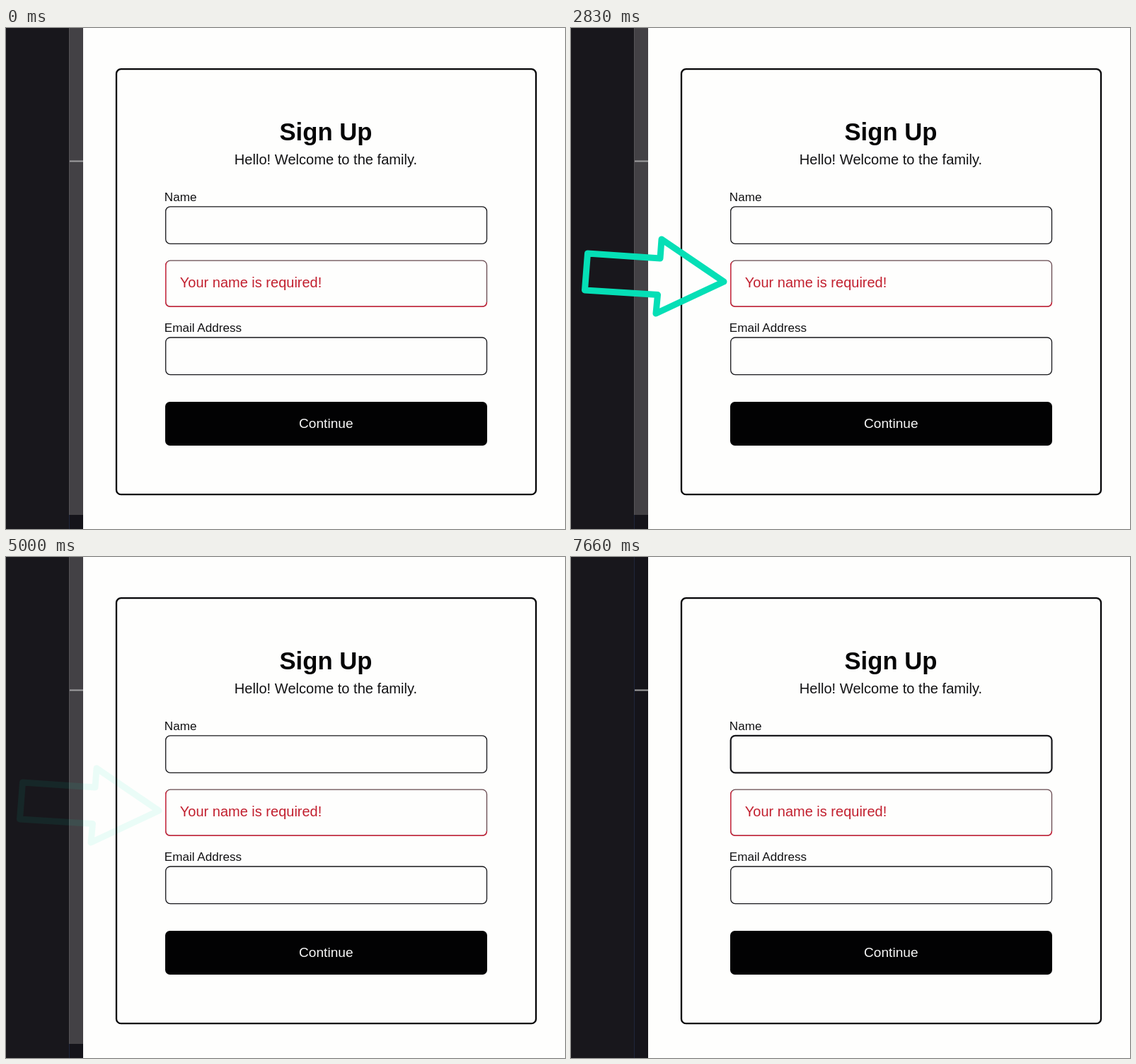
Recreate the animation shown at these times as an HTML page. Size 790 by 709 pixels, loop 8 s.

```html
<!DOCTYPE html>
<html lang="en">
<head>
<meta charset="utf-8">
<title>Sign Up</title>
<style>
  html, body { margin: 0; width: 100%; height: 100%; overflow: hidden; background: #fefefd; }
  svg { display: block; width: 100vw; height: 100vh; }
  text { font-family: "Liberation Sans", Arial, sans-serif; fill: #111113; }
  .mid { text-anchor: middle; }
  .label { font-size: 17.1px; }
  .box { fill: none; stroke: #17171b; stroke-width: 1.3; }
</style>
</head>
<body>
<svg viewBox="0 0 790 709">
  <rect width="790" height="709" fill="#fefefd"/>

  <rect width="109" height="709" fill="#18171c"/>
  <rect x="90" width="19" height="709" fill="#15141a"/>
  <rect x="89" width="1" height="709" fill="#20263a"/>
  <g id="bar">
    <rect x="89" width="20" height="689" fill="#434145"/>
    <rect x="89" width="1" height="689" fill="#565458"/>
  </g>
  <rect x="90" y="187.5" width="19" height="2" fill="#a09fa1"/>

  <rect x="156" y="58.2" width="593" height="602" rx="6.5" fill="none" stroke="#050507" stroke-width="2.3"/>
  <text class="mid" x="452" y="158.5" font-size="34.7" font-weight="700" style="fill:#050506">Sign Up</text>
  <text class="mid" x="452" y="193" font-size="20.1">Hello! Welcome to the family.</text>

  <text class="label" x="223.8" y="244.5">Name</text>
  <rect id="name" class="box" x="225.7" y="252.8" width="453.8" height="52.6" rx="6.5"/>

  <rect class="box" x="225.7" y="329.2" width="453.8" height="65" rx="6.5" style="stroke:#66484e"/>
  <path d="M228 331 Q225.7 332.5 225.7 336 V387.7 Q225.7 394.2 232.2 394.2 H673 Q679.5 394.2 679.5 387.7"
        fill="none" stroke="#cf2a40" stroke-width="1.4"/>
  <text x="245.8" y="367" font-size="20" style="fill:#c2202f">Your name is required!</text>

  <text class="label" x="223.8" y="429.8">Email Address</text>
  <rect class="box" x="225.7" y="438" width="453.8" height="52.6" rx="6.5"/>

  <rect x="225" y="529" width="455" height="62" rx="6.5" fill="#020203"/>
  <text class="mid" x="452.3" y="566" font-size="19.1" style="fill:#f8f8f8">Continue</text>

  <path id="arrow" pathLength="1" fill="none" stroke="#05dfb6" stroke-width="9"
        stroke-linecap="round" stroke-linejoin="round"
        d="M126 326 L128 299 L216 359 L120 404 L122.500 377.500 L19.500 371 L23.500 319 Z"/>

  <rect id="caret" x="240.500" y="268.500" width="1.300" height="22" fill="#111"/>
  <g id="mouse" fill="none" stroke-linecap="square">
    <path d="M-3 -8 H-1 L0 -7 L1 -8 H3 M0 -7 V7 M-3 8 H-1 L0 7 L1 8 H3" stroke="#fff" stroke-width="3"/>
    <path d="M-3 -8 H-1 L0 -7 L1 -8 H3 M0 -7 V7 M-3 8 H-1 L0 7 L1 8 H3" stroke="#222" stroke-width="1.200"/>
  </g>
</svg>
<script>
const LOOP = 8000;
const [bar, field, arrow, caret, mouse] =
  ["bar", "name", "arrow", "caret", "mouse"].map(id => document.getElementById(id));

const clamp = v => Math.min(1, Math.max(0, v));
const easeInOut = p => p < 0.5 ? 4 * p ** 3 : 1 - 4 * (1 - p) ** 3;
const show = (el, on) => el.setAttribute("visibility", on ? "visible" : "hidden");

function draw(ms) {
  const tick = Math.floor((ms + 7) * 0.006);

  const drawn = easeInOut(clamp((tick - 6) / 5.3));
  show(arrow, tick >= 6 && tick < 31);
  arrow.setAttribute("stroke-dasharray", tick < 11 ? `${drawn} 2` : "none");
  arrow.setAttribute("opacity", 1 - 0.92 * clamp((tick - 27) / 3));

  show(bar, tick < 35);
  field.style.strokeWidth = tick < 38 ? 1.3 : 2.2;

  const glide = easeInOut(clamp((tick - 35) / 3));
  show(mouse, tick >= 35 && tick < 40);
  mouse.setAttribute("transform", `translate(${228 + 32 * glide} ${299 - 17 * glide})`);
  show(caret, tick >= 39 && tick < 46);
}

const start = performance.now();
function loop() {
  draw((performance.now() - start) % LOOP);
  requestAnimationFrame(loop);
}
loop();
</script>
</body>
</html>
```
